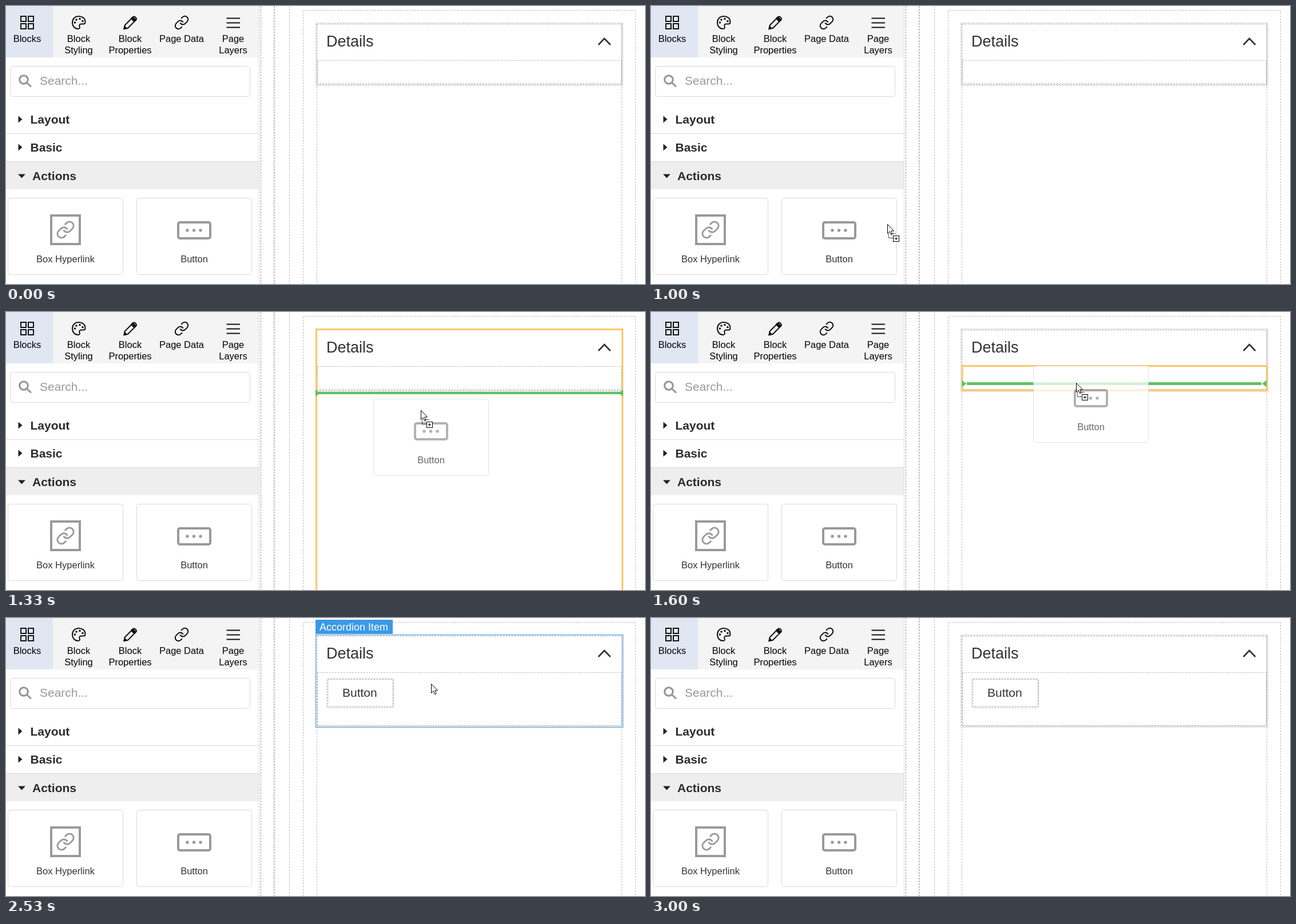
Recreate the animation shown at these times as an HTML page. Size 1117x487 px, loop 4070 ms.

```html
<!DOCTYPE html>
<html lang="en">
<head>
<meta charset="utf-8">
<title>Dragging a button block into an accordion</title>
<style>
html, body { margin: 0; height: 100%; overflow: hidden; background: #fff; }
svg { display: block; width: 1117px; height: 487px; font-family: "Liberation Sans", Arial, sans-serif; }
.tab { font-size: 16.5px; text-anchor: middle; fill: #000; }
.card { font-size: 16.5px; text-anchor: middle; fill: #333; }
.head { font-size: 21px; font-weight: bold; fill: #2b2b2b; }
.big { font-size: 21px; }
.line { fill: none; stroke: #d9d9d9; }
.dash { fill: none; stroke: #bbb; stroke-dasharray: 3 2; }
.dark { stroke: #999; }
.icon { fill: none; stroke: #111; stroke-width: 2; }
.grey { fill: none; stroke: #999; stroke-width: 4; }
.target { fill: none; stroke: #ffc566; stroke-width: 3; }
.hover { fill: none; stroke: #3b97d9; }

/* 61 ticks per loop; the small delay keeps each tick ahead of its time */
.anim { visibility: hidden; animation: 4070ms step-end -6ms infinite; }
.mouse { animation-name: mouse; }
.badge { animation-name: badge; }
.ghost { animation-name: ghost; opacity: .75; }
.over-column { animation-name: over-column; }
.over-list { animation-name: over-list; }
.over-body { animation-name: over-body; }
.drop-low { animation-name: drop-low; }
.drop-high { animation-name: drop-high; }
.empty { animation-name: empty; }
.filled { animation-name: filled; }
.on-item { animation-name: on-item; }
.on-list { animation-name: on-list; }
.on-row { animation-name: on-row; }

@keyframes mouse {
  0% { visibility: hidden; transform: translate(181px, 474px); }
  4.91% { visibility: visible; transform: translate(181px, 474px); animation-timing-function: steps(2); }
  8.19% { visibility: visible; transform: translate(280px, 412px); animation-timing-function: steps(3); }
  13.11% { visibility: visible; transform: translate(367px, 371px); }
  16.39% { visibility: visible; transform: translate(368px, 372px); animation-timing-function: steps(5); }
  24.59% { visibility: visible; transform: translate(413px, 382px); animation-timing-function: steps(2); }
  27.86% { visibility: visible; transform: translate(526px, 325px); animation-timing-function: steps(2); }
  31.14% { visibility: visible; transform: translate(675px, 210px); }
  32.78% { visibility: visible; transform: translate(725px, 172px); animation-timing-function: steps(2); }
  36.06% { visibility: visible; transform: translate(741px, 146px); animation-timing-function: steps(2); }
  39.34% { visibility: visible; transform: translate(743px, 124px); }
  40.98% { visibility: visible; transform: translate(744px, 119px); animation-timing-function: steps(2); }
  44.26% { visibility: visible; transform: translate(746px, 103px); }
  49.18% { visibility: visible; transform: translate(746px, 103px); animation-timing-function: steps(2); }
  52.45% { visibility: visible; transform: translate(743px, 115px); }
  62.29% { visibility: visible; transform: translate(743px, 115px); animation-timing-function: steps(2); }
  65.57% { visibility: visible; transform: translate(690px, 162px); animation-timing-function: steps(2); }
  68.85% { visibility: visible; transform: translate(506px, 300px); animation-timing-function: steps(2); }
  72.13% { visibility: visible; transform: translate(201px, 476px); }
  73.77%, 100% { visibility: hidden; transform: translate(201px, 476px); }
}
@keyframes ghost {
  0% { visibility: hidden; transform: translate(330px, 350px); }
  26.22% { visibility: visible; transform: translate(330px, 350px); }
  27.86% { visibility: visible; transform: translate(443px, 308px); animation-timing-function: steps(2); }
  31.14% { visibility: visible; transform: translate(592px, 190px); }
  32.78% { visibility: visible; transform: translate(642px, 152px); animation-timing-function: steps(2); }
  36.06% { visibility: visible; transform: translate(664px, 118px); animation-timing-function: steps(2); }
  39.34% { visibility: visible; transform: translate(668px, 94px); }
  40.98% { visibility: visible; transform: translate(669px, 89px); animation-timing-function: steps(2); }
  44.26% { visibility: visible; transform: translate(671px, 71px); }
  49.18%, 100% { visibility: hidden; transform: translate(671px, 71px); }
}
@keyframes badge { 19.67% { visibility: visible; } 49.18% { visibility: hidden; } }
@keyframes over-column { 27.86% { visibility: visible; } 31.14% { visibility: hidden; } }
@keyframes over-list { 31.14% { visibility: visible; } 37.7% { visibility: hidden; } }
@keyframes over-body { 37.7% { visibility: visible; } 49.18% { visibility: hidden; } }
@keyframes drop-low { 37.7% { visibility: visible; } 40.98% { visibility: hidden; } }
@keyframes drop-high { 40.98% { visibility: visible; } 49.18% { visibility: hidden; } }
@keyframes empty { 0% { visibility: visible; } 50.81% { visibility: hidden; } }
@keyframes filled { 50.81%, 100% { visibility: visible; } }
@keyframes on-item { 62.29% { visibility: visible; } 67.21% { visibility: hidden; } }
@keyframes on-list { 67.21% { visibility: visible; } 68.85% { visibility: hidden; } }
@keyframes on-row { 68.85% { visibility: visible; } 70.49% { visibility: hidden; } }
</style>
</head>
<body>
<svg viewBox="0 0 1117 487">
  <defs>
    <g id="chain" fill="none" stroke-linecap="round">
      <path d="M-2 1a5 5 0 0 0 7.54.54l3-3a5 5 0 0 0-7.07-7.07l-1.72 1.71"/>
      <path d="M2-1a5 5 0 0 0-7.54-.54l-3 3a5 5 0 0 0 7.07 7.07l1.71-1.71"/>
    </g>
    <g id="button-card">
      <rect x=".5" y=".5" width="201" height="134" rx="4" fill="#fff" stroke="#d9d9d9"/>
      <rect class="grey" x="73" y="43" width="56" height="28" rx="3"/>
      <g fill="#999"><circle cx="89" cy="57" r="2.7"/><circle cx="100.500" cy="57" r="2.7"/><circle cx="112" cy="57" r="2.7"/></g>
      <text class="card" x="101" y="113">Button</text>
    </g>
    <path id="tip" d="M0-6 8 0 0 6Z"/>
  </defs>
  <rect width="1117" height="487" fill="#fff"/>

  <!-- Toolbar -->
  <rect width="442" height="90" fill="#f4f4f4"/>
  <rect width="82" height="90" fill="#e0e7f3"/>
  <g class="icon">
    <path d="M26 18h9v9h-9ZM39 18h9v9h-9ZM26 31h9v9h-9ZM39 31h9v9h-9Z"/>
    <path d="M138.500 28C138.500 21 133 18 127 18C120 18 116 23 116 29C116 35 120 40 126 40C129 40 129.300 37.500 128.500 36C127.500 33 129 31.500 132 31.500H135.500C137.500 31.500 138.500 30 138.500 28Z"/>
    <path d="M206.500 40.200l1.200-6.500L222 19.200a2.600 2.600 0 0 1 3.700 0l1.500 1.500a2.600 2.600 0 0 1 0 3.700L213 38.800ZM219 22l5.500 5.500"/>
    <path d="M222 19.500l5 5-2 2-5.500-5.500ZM206.500 40l1-4 3 3Z" fill="#111"/>
    <path d="M385.500 21.500h23.500M385.500 29.500h23.500M385.500 37.500h23.500"/>
    <use href="#chain" transform="translate(307 29) scale(1.13)" stroke-width="1.8"/>
  </g>
  <g fill="#111"><circle cx="120.500" cy="29" r="1.800"/><circle cx="123" cy="24" r="1.800"/><circle cx="129" cy="22.500" r="1.800"/><circle cx="134" cy="26.500" r="1.800"/></g>
  <g class="tab">
    <text x="37" y="63">Blocks</text>
    <text x="127" y="63">Block</text><text x="127" y="83">Styling</text>
    <text x="217" y="63">Block</text><text x="217" y="83">Properties</text>
    <text x="307" y="63">Page Data</text>
    <text x="397" y="63">Page</text><text x="397" y="83">Layers</text>
  </g>

  <!-- Block list -->
  <rect class="line" x="7.500" y="105.500" width="419" height="53" rx="4"/>
  <g fill="none" stroke="#949494" stroke-width="3"><circle cx="31" cy="129" r="7.300"/><path d="M36 134l8 7.500"/></g>
  <text class="big" x="59" y="138" fill="#999">Search...</text>
  <path class="line" d="M0 223.500h442M0 272.500h442"/>
  <rect y="273" width="442" height="48" fill="#eee"/>
  <path d="M21.500 192.500l7 6-7 6ZM21.500 241.500l7 6-7 6ZM21 294.500h13l-6.500 7Z" fill="#222"/>
  <g class="head">
    <text x="42.500" y="206">Layout</text>
    <text x="42.500" y="255">Basic</text>
    <text x="46" y="305">Actions</text>
  </g>
  <rect class="line" x="3.500" y="336.500" width="201" height="134" rx="4"/>
  <rect class="grey" x="79" y="367" width="50" height="50"/>
  <use href="#chain" transform="translate(104 392) scale(1.42)" stroke="#999" stroke-width="2"/>
  <text class="card" x="104" y="449">Box Hyperlink</text>
  <use href="#button-card" x="228" y="336"/>

  <!-- Page -->
  <path class="line" d="M442.500 0v487M467.500 0v487"/>
  <path class="dash dark" d="M445.500 0v487M469.500 0v487"/>
  <path class="dash" d="M495.500 0v487M519.500 487V7.500H1100.500V487M543.500 31v456M1076.500 31v456"/>
  <g class="anim empty">
    <rect class="line" x="541.500" y="29.500" width="537" height="110"/>
    <rect class="dash dark" x="543.500" y="31.500" width="533" height="106"/>
    <rect class="dash" x="544.500" y="95.500" width="531" height="40"/>
  </g>
  <g class="anim filled">
    <rect class="line" x="541.500" y="29.500" width="537" height="162"/>
    <rect class="dash dark" x="543.500" y="31.500" width="533" height="158"/>
    <rect class="dash" x="544.500" y="95.500" width="531" height="93"/>
    <rect class="line" x="560.500" y="105.500" width="117" height="52" rx="4"/>
    <rect class="dash dark" x="562.500" y="107.500" width="114" height="48"/>
    <text class="big" x="588" y="138" fill="#333">Button</text>
  </g>
  <text x="560" y="71" font-size="27" fill="#333">Details</text>
  <path d="M1035.500 68L1046 57l10.500 11" fill="none" stroke="#333" stroke-width="2.600"/>

  <!-- Hover outlines -->
  <g class="anim on-item">
    <rect class="hover" x="541.500" y="29.500" width="537" height="162"/>
    <rect x="541" y="3" width="135" height="25" fill="#3b99e8"/>
    <text x="548" y="22" font-size="18" fill="#fff">Accordion Item</text>
  </g>
  <path class="anim on-list hover" d="M541.500 487V29.500H1078.500V487"/>
  <path class="anim on-row hover" d="M495.500 487V.5H1116.500V487"/>

  <!-- Drop targets -->
  <path class="anim over-column target" d="M518.500 490V6.500H1101.500V490"/>
  <g class="anim over-list">
    <path class="target" d="M542.500 490V30.500H1077.500V490"/>
    <g fill="#5fc163">
      <rect x="543" y="140" width="534" height="4"/>
      <use href="#tip" x="541" y="142"/><use href="#tip" transform="translate(1079 142) scale(-1 1)"/>
    </g>
  </g>
  <rect class="anim over-body target" x="544" y="94.500" width="532.500" height="42.500"/>
  <g class="anim drop-low" fill="#5fc163">
    <rect x="552" y="123" width="515" height="5"/>
    <use href="#tip" x="543.500" y="125.500"/><use href="#tip" transform="translate(1076 125.500) scale(-1 1)"/>
  </g>
  <g class="anim drop-high" fill="#5fc163">
    <rect x="552" y="101" width="516" height="4"/>
    <use href="#tip" x="550" y="103"/><use href="#tip" transform="translate(1070 103) scale(-1 1)"/>
  </g>

  <g class="anim ghost"><use href="#button-card"/></g>
  <g class="anim mouse">
    <path d="M.5.500V16.500L4.200 13 6.700 18.800 9.200 17.800 6.700 12H11.500Z" fill="#fff" stroke="#000"/>
    <g class="anim badge">
      <path d="M7 16.500H14.500M2.500 16.500v8h8" fill="none" stroke="#000" stroke-dasharray="2 1"/>
      <rect x="10.500" y="20.500" width="10" height="10" fill="#fff" stroke="#000"/>
      <path d="M13 25.500h5M15.500 23v5" stroke="#000"/>
    </g>
  </g>
</svg>
</body>
</html>
```
